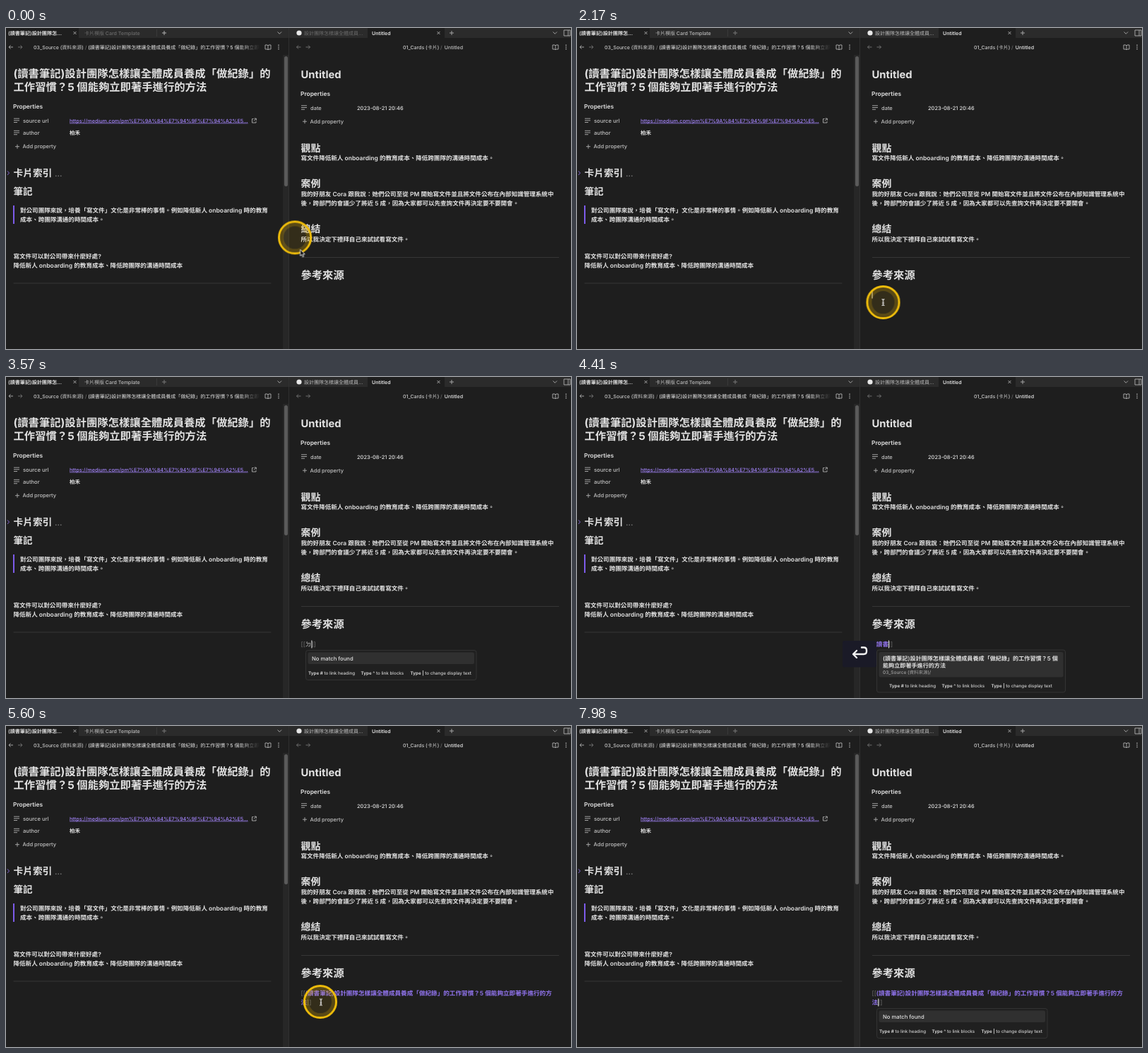
Write an HTML page that moves like this. It is 800 by 454 pixels and loops after 8 s.

```html
<!DOCTYPE html>
<html lang="zh-Hant">
<head>
<meta charset="utf-8">
<title>Linking notes</title>
<style>
  html, body { margin: 0; width: 100%; height: 100%; overflow: hidden; background: #1e1e1e; }
  svg { display: block; width: 100vw; height: 100vh; }
  text { font-family: Inter, "Noto Sans CJK TC", "Noto Sans CJK", sans-serif; text-rendering: geometricPrecision; white-space: pre; }
  .icon { fill: none; stroke: #b0b0b0; stroke-width: .9; }
  .soft { stroke: #777; }
</style>
</head>
<body>
<svg id="stage" viewBox="0 0 800 454" preserveAspectRatio="none">
  <defs>
    <linearGradient id="fade">
      <stop offset="0" stop-color="#1e1e1e" stop-opacity="0"/>
      <stop offset="1" stop-color="#1e1e1e"/>
    </linearGradient>
  </defs>
</svg>
<script>
const LOOP = 8000;
const stage = document.getElementById('stage');
const WHITE = '#e2e2e2', GREY = '#c2c2c2', DIM = '#6c6c6c', PURPLE = '#9174ee', BG = '#1e1e1e';
const BODY = 8.56, LINK = 8.6;

const topic = '設計團隊怎樣讓全體成員養成「做紀錄」的工作習慣？5 個能夠立即著手進行的方法';
const note = '(讀書筆記)' + topic;
const source = '03_Source (資料來源)';

function add(tag, attrs, parent = stage) {
  const el = document.createElementNS('http://www.w3.org/2000/svg', tag);
  for (const key in attrs) el.setAttribute(key, attrs[key]);
  return parent.appendChild(el);
}
const group = (parent = stage) => add('g', {}, parent);
const rect = (x, y, width, height, fill, parent, more = {}) =>
  add('rect', { x, y, width, height, fill, ...more }, parent);
const icon = (d, cls = '', parent) => add('path', { d, class: 'icon ' + cls }, parent);

// content is a string or a list of strings and [string, attributes] runs
function text(x, y, size, content, fill = WHITE, weight = 500, parent = stage, more = {}) {
  const el = add('text', { x, y, 'font-size': size, fill, 'font-weight': weight, ...more }, parent);
  for (const [run, attrs] of [].concat(content).map(c => Array.isArray(c) ? c : [c, {}]))
    add('tspan', attrs, el).textContent = run;
  return el;
}

const plus = (x, y, r = 3) => icon(`M${x - r} ${y}h${2 * r}M${x} ${y - r}v${2 * r}`);
const cross = (x, y) => icon(`M${x - 2} ${y - 2}l4 4m0-4l-4 4`);
const lines = (x, y) => icon(`M${x} ${y - 2.7}h8M${x} ${y}h8M${x} ${y + 2.7}h5`);
const rule = (x, y) => rect(x, y, 365, 1, '#363636');

function toolbar(x, end) {
  icon(`M${x + 7} 27h-6m2.5-2.5l-2.5 2.5l2.5 2.5`, x > 400 ? 'soft' : '');
  icon(`M${x + 14} 27h6m-2.5-2.5l2.5 2.5l-2.5 2.5`, 'soft');
  icon(`M${end - 19} 24h3l1 1l1-1h3v6h-3l-1 1l-1-1h-3zM${end - 15} 25v6`);
  for (const y of [24.3, 27, 29.7]) add('circle', { cx: end, cy: y, r: .8, fill: GREY });
}

const heading = (x, y, size, label) => text(x, y, size, label, WHITE, 700);
const paragraph = (x, y, line) => text(x, y, BODY, line, WHITE, 600);
const properties = (x, y) => text(x, y, 8.4, 'Properties', WHITE, 600);
function addProperty(x, y) {
  plus(x, y - 2.6);
  text(x + 7.5, y, 7.5, 'Add property', GREY);
}

// Window chrome
rect(0, 0, 800, 454, BG);
rect(0, 0, 800, 14, '#2b2b2b');
rect(0, 0, 103, 14.5, BG);
rect(512, 0, 109, 14.5, BG);
rect(392, 38, 8, 416, '#272727');
rect(394, 40, 5, 184, '#5a5a5a', stage, { rx: 2.5 });
rect(400, 0, 1, 454, '#303030');

text(3, 10.2, 7.1, '(讀書筆記)' + topic.slice(0, 5) + '...', WHITE, 600);
const idleTabs = [
  text(111, 10.2, 7, '卡片模版 Card Template', DIM),
  text(422, 10.2, 7, topic.slice(0, 11) + '...', DIM)
];
rect(213, 2, 1, 10, '#3a3a3a');
text(518, 10.2, 7, 'Untitled', WHITE, 600);
add('circle', { cx: 415, cy: 7, r: 3.6, fill: '#e8e8e8' });
cross(97.5, 7); cross(612.5, 7);
const leftPlus = plus(224, 7);
plus(631, 7);
icon('M384.5 5.5l2.8 2.8l2.8-2.8M774.5 5.5l2.8 2.8l2.8-2.8');
icon('M790 3h9v8h-9zM796 3v8');
toolbar(3, 386); toolbar(410.5, 793);

text(39, 29.7, 7, [[source, { fill: '#c8c8c8' }], [' / ', { fill: DIM }], note.slice(0, 38)]);
rect(330, 20, 30, 14, 'url(#fade)');
rect(360, 20, 5, 14, BG);
text(562, 29.7, 7, [['01_Cards (卡片)', { fill: '#c8c8c8' }], [' / ', { fill: DIM }]]);
const crumb = text(647, 29.7, 7, 'Untitled', GREY, 500, stage, { 'text-anchor': 'end' });

// Left note
heading(10.5, 70.3, 15.33, note.slice(0, 25));
heading(10.5, 88.8, 15.33, note.slice(25));
properties(10, 114.2);
lines(11, 130.8);
text(24, 133.5, 7.6, 'source url', GREY);
text(90, 133.5, 7.26, 'https://medium.com/pm%E7%9A%84%E7%94%9F%E7%94%A2%E5...', '#a283f8', 500, stage,
  { 'text-decoration': 'underline' });
icon('M350.5 128.5h-2v5.5h5.5v-2M351.5 128h2.8v2.8M354.3 128l-3.5 3.5');
lines(11, 148);
text(24, 150.7, 7.6, 'author', GREY);
text(90, 150.9, 7.5, '柏禾', WHITE, 600);
addProperty(16, 170.3);
icon('M2 202.3l2.5 2.8l-2.5 2.8').style.stroke = PURPLE;
heading(10.5, 210.2, 13.7, '卡片索引');
text(69, 210, 11, '...', '#777', 600);
heading(10.5, 235.6, 13.5, '筆記');
rect(10, 251, 2, 26, '#7d5bea');
paragraph(20, 261.3, '對公司團隊來說，培養「寫文件」文化是非常棒的事情。例如降低新人 onboarding 時的教育');
paragraph(20, 274.2, '成本、跨團隊溝通的時間成本。');
paragraph(10.5, 326, '寫文件可以對公司帶來什麼好處?');
paragraph(10.5, 338.8, '降低新人 onboarding 的教育成本、降低跨團隊的溝通時間成本');
rule(10.5, 360.5);

// Right note
heading(417.5, 70.5, 14.8, 'Untitled');
properties(417, 96);
lines(418, 112.5);
text(431, 115.5, 7.5, 'date', GREY);
text(497, 115.5, 7.45, '2023-08-21 20:46');
addProperty(423, 134.8);
heading(417.5, 175, 13.9, '觀點');
paragraph(417.5, 187, '寫文件降低新人 onboarding 的教育成本、降低跨團隊的溝通時間成本。');
heading(417.5, 225, 13.9, '案例');
paragraph(417.5, 238, '我的好朋友 Cora 跟我說：她們公司至從 PM 開始寫文件並且將文件公布在內部知識管理系統中');
paragraph(417.5, 251, '後，跨部門的會議少了將近 5 成，因為大家都可以先查詢文件再決定要不要開會。');
heading(417.5, 289.3, 13.9, '總結');
paragraph(417.5, 302, '所以我決定下禮拜自己來試試看寫文件。');
rule(418, 324);
heading(417.5, 355, 15.3, '參考來源');

// Timing helpers
const options = { duration: LOOP, iterations: Infinity };
function animate(el, frames) {
  el.animate(frames.map(([ms, props]) => ({ offset: ms / LOOP, ...props })), options);
}
function show(el, ...spans) {
  const step = (ms, opacity) => [ms, { opacity, easing: 'step-end' }];
  const frames = spans.flatMap(([from, to]) => [step(from, 1), step(to, 0)]);
  if (spans[0][0] > 0) frames.unshift(step(0, 0));
  if (spans.at(-1)[1] < LOOP) frames.push(step(LOOP, 0));
  animate(el, frames);
}
function recolor(el, prop, from, to, ms) {
  animate(el, [[0, { [prop]: from, easing: 'step-end' }], [ms, { [prop]: to }], [LOOP, { [prop]: to }]]);
}
function travel(el, stops) {
  animate(el, stops.map(([ms, x, y]) =>
    [ms, { transform: `translate(${x}px, ${y}px)`, easing: 'ease-out' }]));
}

// Focus moves to the right pane
const FOCUS = 1720;
idleTabs.forEach(el => recolor(el, 'fill', DIM, '#bcbcbc', FOCUS));
recolor(crumb, 'fill', GREY, '#ececec', FOCUS);
recolor(leftPlus, 'stroke', '#c0c0c0', '#808080', FOCUS);

// Typed link
const caret = (x, y, ...spans) => show(rect(x, y, 1, 11, '#e6e6e6'), ...spans);
const bracket = { fill: '#707070', 'font-weight': 400 };
function typed(from, to, word, fill) {
  const g = group();
  const line = text(417.5, 381, LINK, [['[[', bracket], [word, { fill }], [']]', bracket]], WHITE, 600, g);
  const ahead = line.childNodes[0].getComputedTextLength() + line.childNodes[1].getComputedTextLength();
  rect(417.5 + ahead, 372.5, 1, 11, '#e6e6e6', g);
  show(g, [from, to]);
}
const steps = [[2450, ''], [3290, 'ㄉ'], [3710, 'ㄉㄨ'], [3850, '讀'], [3990, '讀ㄕ'], [4130, '讀ㄕㄨ'], [4270, '讀書'], [4760]];
steps.slice(0, -1).forEach(([from, word], i) =>
  typed(from, steps[i + 1][0], word, i > 2 ? PURPLE : '#8a8a8a'));
caret(417.5, 371.5, [FOCUS, 2240], [2380, 2450]);

const link = group();
text(417.5, 381, LINK, [['[[', bracket], note.slice(0, -1)], PURPLE, 600, link);
text(417.5, 394, LINK, [note.slice(-1), [']]', bracket]], PURPLE, 600, link);
show(link, [4760, LOOP]);
caret(432, 385.5, [4760, 5260], [5760, 6160]);
caret(426.3, 385.5, [6160, 6580], [6650, LOOP]);

// Suggestion popups
function panel(x, y, width, height, rowHeight) {
  const g = group();
  rect(x, y, width, height, '#202020', g, { rx: 3, stroke: '#393939', 'stroke-width': .8 });
  rect(x + 3, y + 3, width - 6, rowHeight, '#303030', g, { rx: 2.5 });
  return g;
}
function hints(x, y, g) {
  const bold = { 'font-weight': 700 };
  [[0, '#', 'link heading'], [74.5, '^', 'link blocks'], [144.5, '|', 'change display text']]
    .forEach(([dx, key, what]) => text(x + dx, y, 6.25, [['Type ' + key, bold], ' to ' + what], '#d0d0d0', 500, g));
}
function match(g) {
  text(433, 400.5, 8.1, note.slice(0, 33), WHITE, 600, g);
  text(433, 411, 8.1, note.slice(33), WHITE, 600, g);
  text(433, 419.7, 6.5, source + '/', '#a0a0a0', 500, g);
}
function noMatch(y, from, to) {
  const g = panel(424.5, y, 241.5, 42, 16.5);
  text(433, y + 14, 7.7, 'No match found', WHITE, 500, g);
  hints(428, y + 34.4, g);
  show(g, [from, to]);
}
const recent = panel(424.5, 386, 267, 80, 35.5);
match(recent);
text(433, 436, 8.1, '卡片模版 Card Template', WHITE, 600, recent);
show(recent, [2520, 3290]);
noMatch(386.5, 3290, 4270);
const found = panel(424.5, 386, 267, 60, 35.5);
match(found);
hints(442, 439.4, found);
show(found, [4270, 4760]);
noMatch(399.5, 6650, LOOP);

// Key display
const key = group();
rect(376, 373, 48, 37.5, '#1a1a27', key, { rx: 3 });
add('path', {
  d: 'M396 387l-5 5l5 5M391.5 392h14.5q4 0 4-4v-1.500q0-4-4-4h-3',
  fill: 'none', stroke: '#f4f4f4', 'stroke-width': 2.4, 'stroke-linecap': 'round', 'stroke-linejoin': 'round'
}, key);
show(key, [4340, 5320]);

// Pointer with its highlight ring
const pointerLayer = group();
const ring = group(pointerLayer);
add('circle', { r: 22.6, fill: '#f0b800', 'fill-opacity': .1, stroke: '#efbd0b', 'stroke-width': 3 }, ring);
add('circle', { r: 18.6, fill: 'none', stroke: '#f0b800', 'stroke-opacity': .2, 'stroke-width': 5 }, ring);
travel(ring, [[0, 409, 296], [420, 433, 385], [840, 435, 394], [1400, 435, 394], [1680, 433.5, 388],
  [5180, 462, 404], [5600, 445, 390], [6020, 429, 391], [LOOP, 429, 391]]);

const cursor = group(pointerLayer);
const arrow = add('path', {
  d: 'M0 0v9l2.100-1.800l1.400 3.200l1.600-.7l-1.400-3.100h2.800z', fill: '#111', stroke: '#f0f0f0', 'stroke-width': .9
}, cursor);
const beam = add('path', {
  d: 'M-2-4.500q2 0 2 1.500v6q0 1.500-2 1.500M2-4.500q-2 0-2 1.500M0 3q0 1.500 2 1.500M-1.300 1h2.600',
  fill: 'none', stroke: '#f0f0f0', 'stroke-width': 1.2
}, cursor);
show(arrow, [0, 1610]);
show(beam, [1610, LOOP]);
// The pointer rests at the click point until it is moved again
travel(cursor, [[0, 416.5, 313], [420, 434.5, 388], [840, 435.5, 393], [1400, 435.5, 393], [1680, 433.5, 388],
  [2380, 433.5, 388], [5180, 462, 404], [5600, 446, 390.5], [6020, 429, 391], [LOOP, 429, 391]]);
ring.getAnimations()[0].effect.setKeyframes(
  [[0, 409, 296], [420, 433, 385], [840, 435, 394], [1400, 435, 394], [1680, 433.5, 388],
   [2380, 433.5, 388], [5180, 462, 404], [5600, 445, 390], [6020, 429, 391], [LOOP, 429, 391]]
    .map(([ms, x, y]) => ({ offset: ms / LOOP, transform: `translate(${x}px, ${y}px)`, easing: 'ease-out' })));
show(pointerLayer, [0, 2380], [5180, 6580]);
</script>
</body>
</html>
```
